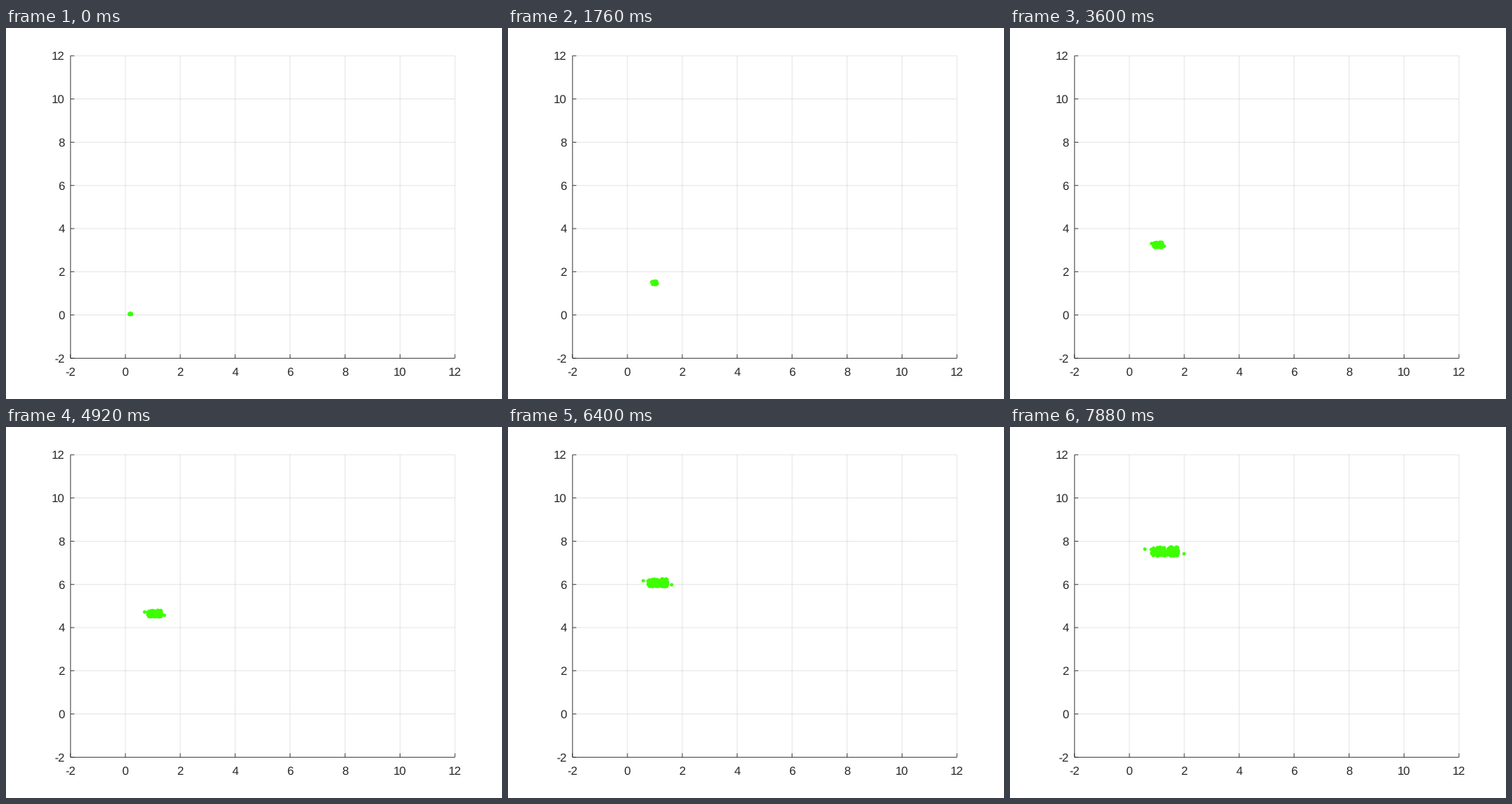
These frames come from a looping animation (640 px wide and 479 px high, 8000 ms). A matplotlib script:

```python
import numpy as np
import matplotlib.pyplot as plt
from matplotlib.animation import FuncAnimation

W, H, DPI = 640, 479, 100
LOOP, TICK = 8000, 40
PX = 72 / DPI  # points per pixel
INK, GREEN = "#262626", "#3dff00"
LO, HI = -2, 12

plt.rcParams.update({
    "font.family": "Liberation Sans",
    "font.size": 15.2 * PX,
    "axes.unicode_minus": False,
    "text.hinting": "none",
})

# Key points of the cloud's path: ms, x, y
KEYS = np.array([
    (0, 160.5, 369.4), (880, 184, 354), (1720, 189, 329), (3560, 190.9, 280),
    (5720, 192.2, 218), (7080, 194, 182.2), (7880, 199.6, 160.7),
])

# A dense core with one stray particle at either end
rng = np.random.default_rng(4)
CLOUD = np.vstack([
    [(-25.5, -3), (25, 3)],
    rng.uniform((-17.5, -6), (17.5, 6), (130, 2)),
])


def update_time(ms):
    """Updates come every 80 ms, and each fifth one is skipped."""
    k = (ms - 40) // 80
    if k % 5 == 2:
        k -= 1
    return max(0, 40 + 80 * k)


def particles(ms):
    t = update_time(ms)
    u = t / KEYS[-1, 0]
    spread = .06 + .94 * u ** 1.6, .08 + .92 * u ** .8
    center = [np.interp(t, KEYS[:, 0], KEYS[:, j]) for j in (1, 2)]
    return center + CLOUD * spread


fig = plt.figure(figsize=(W / DPI, (H + .01) / DPI), dpi=DPI, facecolor="white")

ticks = range(LO, HI + 1, 2)
ax = fig.add_axes([.13, .11, .775, .815])
ax.set(xlim=(LO, HI), ylim=(LO, HI), xticks=ticks, yticks=ticks)
ax.spines[:].set_visible(False)
ax.tick_params(length=0, labelcolor=INK)
ax.tick_params(axis="x", pad=11.5 * PX)
ax.tick_params(axis="y", pad=7 * PX)


def rules(at, x_end, y_end, **style):
    """Lines that start on the axes and run to x_end or y_end."""
    style = dict(color=INK, lw=.8 * PX, snap=False, clip_on=False) | style
    ax.hlines(at, LO, x_end, **style)
    ax.vlines(at, LO, y_end, **style)


rules(ticks, HI, HI, alpha=.14)
rules(ticks, LO + .14, LO + .18)
rules([LO], HI, HI)

# Overlay in stage pixels
stage = fig.add_axes([0, 0, 1, 1])
stage.set(xlim=(0, W), ylim=(H, 0))
stage.axis("off")
sizes = np.full(len(CLOUD), (4.5 * PX) ** 2)
dots = stage.scatter(*particles(0).T, s=sizes, color=GREEN, linewidths=0)


def draw(i):
    dots.set_offsets(particles(i * TICK))
    return dots,


anim = FuncAnimation(fig, draw, frames=LOOP // TICK, interval=TICK,
                     init_func=lambda: draw(0), repeat=True, repeat_delay=0)
plt.show()
```
